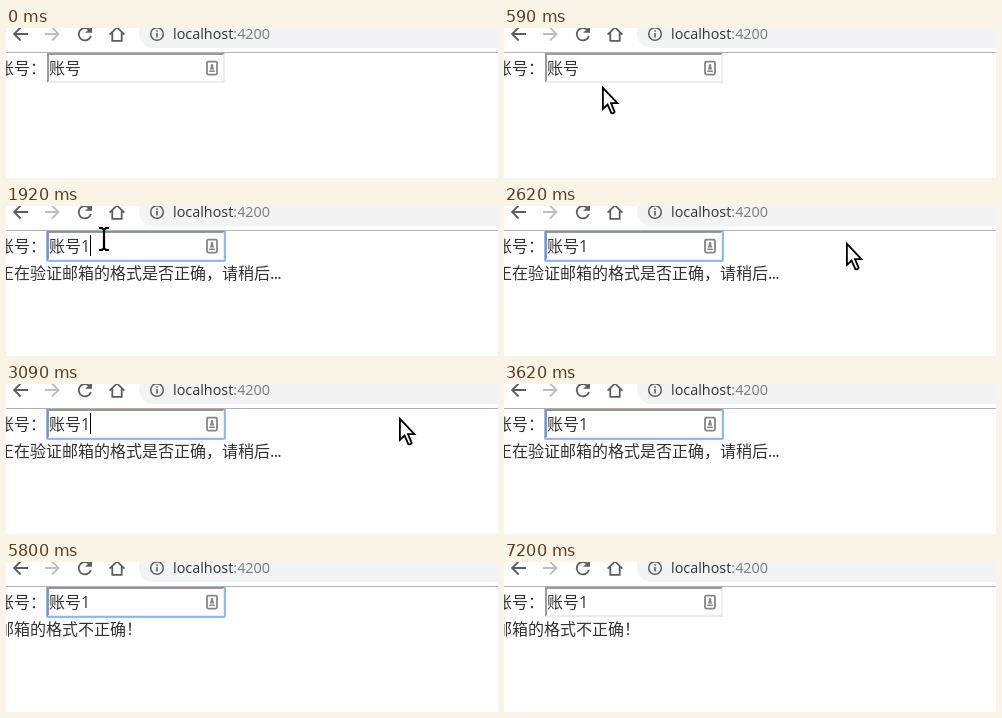
An HTML page that plays this animation: 492x150 px, repeating every 7280 ms.

```html
<!DOCTYPE html>
<html lang="zh-CN">
<head>
<meta charset="utf-8">
<title>账号验证</title>
<style>
  html, body { margin: 0; width: 100%; height: 100%; overflow: hidden; background: #fff; }
  svg { display: block; width: 492px; height: 150px; }
  text { font: 16px "Noto Sans CJK SC", "Noto Sans CJK", sans-serif; fill: #333; white-space: pre; }
  .latin { font-family: "Open Sans", "Noto Sans", sans-serif; }
  .url { font-size: 14.4px; }
  .icon { fill: none; stroke: #5a5d61; stroke-width: 1.8; }

  .timed { animation: 7280ms step-end infinite; }
  #ring { animation-name: focus; }
  #caret { animation-name: blink; }
  #digit { animation-name: typed; }
  #pending { animation-name: pending; }
  #invalid { animation-name: invalid; }
  #beam { animation-name: beam; }
  #arrow { animation-name: arrow; }

  @keyframes focus {
    0%, 98.9% { opacity: 0; }
    11.4% { opacity: .6; }
  }
  @keyframes blink {
    0%, 18.81%, 33.92%, 47.66%, 62.77%, 77.47%, 91.34% { opacity: 0; transform: translateX(9px); }
    11.4% { opacity: 1; transform: none; }
    25.41%, 40.24%, 55.21%, 70.05%, 83.79% { opacity: 1; transform: translateX(9px); }
  }
  @keyframes typed {
    0% { opacity: 0; }
    25.41%, 100% { opacity: 1; }
  }
  @keyframes pending {
    0%, 66.89% { opacity: 0; }
    26.37% { opacity: 1; }
  }
  @keyframes invalid {
    0% { opacity: 0; }
    66.89%, 100% { opacity: 1; }
  }
  /* Both pointers wait off stage while unused. */
  @keyframes beam {
    0%, 35.02%, 100% { transform: translate(-99px, 0); }
    8.24% { transform: translate(97px, 48px); }
    9.34% { transform: translate(97px, 40px); }
    10.3% { transform: translate(98px, 35px); }
    11.4% { transform: translate(98px, 33px); }
    31.86% { transform: translate(105px, 32px); }
    32.96% { transform: translate(150px, 31px); }
    33.92% { transform: translate(205px, 32px); }
  }
  @keyframes arrow {
    0%, 8.24%, 49.72%, 79.67%, 100% { transform: translate(-99px, 0); }
    3.98% { transform: translate(211px, 89px); }
    5.08% { transform: translate(100px, 64px); }
    7.14% { transform: translate(98px, 58px); }
    35.02% { transform: translate(280px, 34px); }
    35.98% { transform: translate(342px, 36px); }
    37.08% { transform: translate(356px, 36px); }
    38.18% { transform: translate(366px, 35px); }
    39.14% { transform: translate(374px, 35px); }
    40.24% { transform: translate(380px, 34px); }
    41.34% { transform: translate(384px, 33px); }
    42.44% { transform: translate(393px, 33px); }
    43.4% { transform: translate(400px, 33px); }
    46.56% { transform: translate(425px, 36px); }
    47.66% { transform: translate(455px, 40px); }
    48.76% { transform: translate(482px, 41px); }
    76.37% { transform: translate(470px, 112px); }
    77.47% { transform: translate(462px, 128px); }
    78.57% { transform: translate(455px, 142px); }
  }
</style>
</head>
<body>
<svg viewBox="0 0 492 150">
  <defs><clipPath id="page"><rect y="25" width="492" height="125"/></clipPath></defs>

  <!-- Browser bar -->
  <rect x="133" y="-9" width="400" height="29" rx="14.5" fill="#f1f3f4"/>
  <path d="M0 24.5H492" stroke="#b2b2b2"/>
  <g class="icon">
    <path d="M22 6H8.5M14.6 -.5L8.1 6L14.6 12.5"/>
    <path d="M39 6H52M46 -.5L52.5 6L46 12.5" stroke="#bcbec1"/>
    <path d="M83.5 2A6.2 6.2 0 1 0 84.9 8"/>
    <path d="M86 -2V4.8H79.2Z" fill="#5a5d61" stroke="none"/>
    <path d="M103.6 6.6L111 -.6L118.4 6.6M106.3 4.6V12.8H115.7V4.6"/>
    <circle cx="151" cy="6" r="6.3" stroke-width="1.5"/>
    <path d="M151 5V9.5M151 2.2V3.8" stroke-width="1.6"/>
  </g>
  <text class="latin url" x="167" y="11">localhost<tspan fill="#777b80">:4200</tspan></text>

  <!-- Form -->
  <text x="-8" y="46">账号：</text>
  <path d="M41 55V25H219L217 27H43V53Z" fill="#9a9a9a"/>
  <path d="M219 25V55H41L43 53H217V27Z" fill="#ececec"/>
  <g clip-path="url(#page)">
    <rect id="ring" class="timed" x="41" y="25" width="178" height="30" rx="1" fill="none" stroke="#4d90fe" stroke-width="2"/>
  </g>
  <text x="43" y="46">账号</text>
  <text id="digit" class="latin timed" x="75" y="46">1</text>
  <rect id="caret" class="timed" x="75" y="29" width="1" height="21" fill="#000"/>
  <g fill="#858585">
    <rect x="201" y="33.6" width="10" height="13" rx="1.5" fill="none" stroke="#858585" stroke-width="1.8"/>
    <circle cx="206" cy="37.4" r="1.3"/>
    <path d="M205.2 37.4H206.8L208.3 41.6H203.7ZM203.2 42.6H208.8V44H203.2Z"/>
  </g>
  <text id="pending" class="timed" x="-8" y="73">正在验证邮箱的格式是否正确，请稍后<tspan letter-spacing="-.8">...</tspan></text>
  <text id="invalid" class="timed" x="-8" y="73">邮箱的格式不正确！</text>

  <!-- Pointers -->
  <path id="beam" class="timed" d="M-5 -11H-2L0 -9L2 -11H5M0 -9V9M-5 11H-2L0 9L2 11H5" fill="none" stroke="#000" stroke-width="2.2"/>
  <path id="arrow" class="timed" d="M.9 1.8V23L5.6 18.6L9.4 27.2Q11.6 28 12.6 25.8L9 17.2H15.4Z" fill="#fff" stroke="#000" stroke-width="1.8"/>
</svg>
</body>
</html>
```
